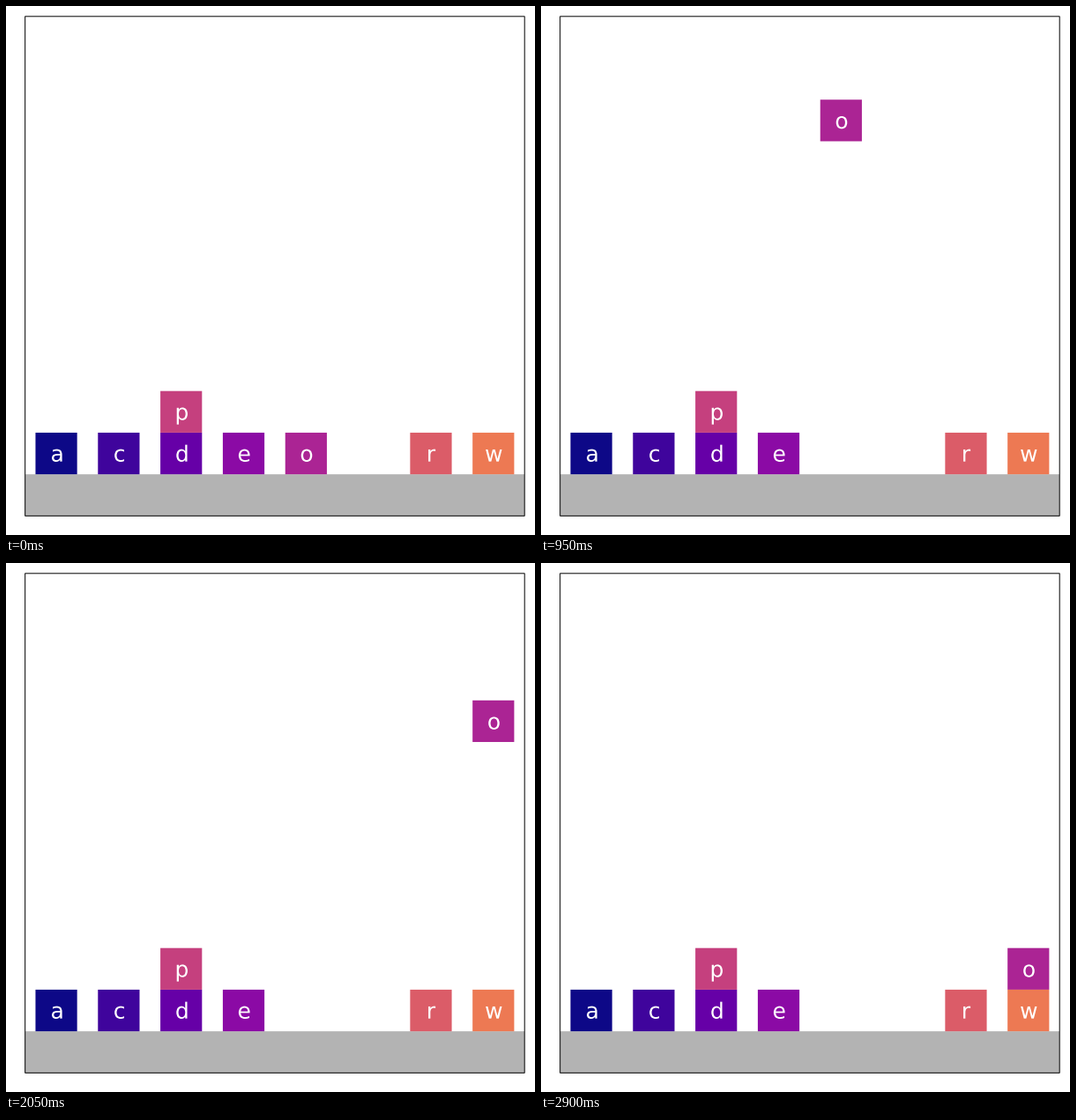
Write a matplotlib script that moves like this. It is 600 px wide and 600 px high and loops after 2.95 s.

```python
import matplotlib.pyplot as plt
from matplotlib.animation import FuncAnimation
from matplotlib.patches import PathPatch, Rectangle
from matplotlib.textpath import TextPath
from matplotlib.transforms import Affine2D

SIDE = 600
MM = 100 / 25.4                         # pixels per millimetre
LEFT, TOP = 5.5 * MM, 3 * MM            # stage margins; bottom and right match
SPAN = SIDE - LEFT - TOP
UNITS = 12                              # frame side, in block widths
EM = 25 * UNITS / SPAN                  # 18 pt lettering, in block widths
CAP = 0.729 * EM
FRAMES, STEP_MS = 59, 50

LETTERS = "acdeoprw"
GAP = 0.25
PITCH = 1.5
LIFT = 9                                # height at which a block travels
START, GOAL = (GAP + 4 * PITCH, 1), (GAP + 7 * PITCH, 2)

fig = plt.figure(figsize=(SIDE / 100, SIDE / 100), dpi=100, facecolor="white")
ax = fig.add_axes([LEFT / SIDE, LEFT / SIDE, SPAN / SIDE, SPAN / SIDE])
ax.set(xlim=(0, UNITS), ylim=(0, UNITS))
ax.axis("off")


def rect(x, y, w, h, **style):
    return ax.add_patch(Rectangle((x, y), w, h, snap=False, **style))


rect(0, 0, UNITS, 1, fc="0.7", lw=0)
rect(0, 0, UNITS, UNITS, fc="none", ec="black", lw=0.72, clip_on=False, zorder=3)


class Block:
    def __init__(self, letter, color, x, y):
        self.box = rect(0, 0, 1, 1, fc=color, lw=0)
        glyph = TextPath((0, 0), letter, size=EM, prop={"family": "DejaVu Sans"})
        self.dx = 0.5 - glyph.get_extents().x1 / 2
        self.dy = 0.5 - CAP / 2
        self.label = ax.add_patch(PathPatch(glyph, fc="white", lw=0, snap=False, zorder=2))
        self.move(x, y)

    def move(self, x, y):
        self.box.set_xy((x, y))
        shift = Affine2D().translate(x + self.dx, y + self.dy)
        self.label.set_transform(shift + ax.transData)


def home(i, letter):
    # p rests on d; every other block stands in its own column
    return (GAP + 2 * PITCH, 2) if letter == "p" else (GAP + i * PITCH, 1)


blocks = {c: Block(c, plt.cm.plasma(i * 2 / 21), *home(i, c))
          for i, c in enumerate(LETTERS)}


def mix(a, b, t):
    return a + (b - a) * t


def place(n):
    """Lift, wait, slide across, lower; each move after a rest skips one step."""
    (x0, y0), (x1, y1) = START, GOAL
    if n < 20:
        return x0, mix(y0, LIFT, (n + 1) / 20 if n else 0)
    if n < 30:
        return x0, LIFT
    if n <= 38:
        return mix(x0, x1, (n - 28) / 10), LIFT
    return x1, mix(LIFT, y1, (n - 38) / 20)


def draw(n):
    blocks["o"].move(*place(n))
    return blocks["o"].box, blocks["o"].label


anim = FuncAnimation(fig, draw, frames=FRAMES, interval=STEP_MS, repeat=True,
                     repeat_delay=0, init_func=lambda: draw(0))
plt.show()
```
